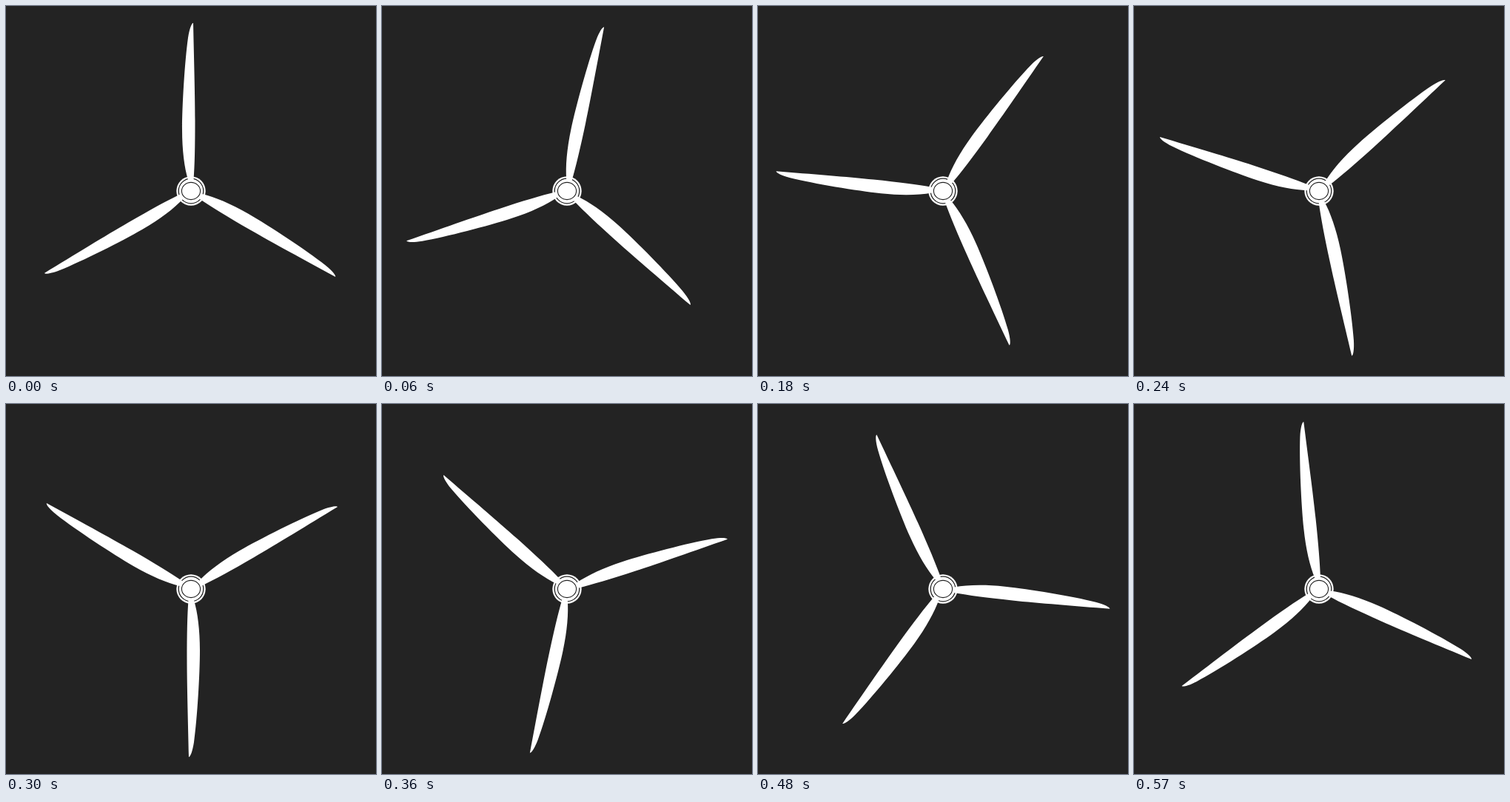
An HTML page for the animation above (0.6 s loop, 500 px wide and 500 px high).

```html
<!DOCTYPE html>
<html lang="en">
<head>
<meta charset="utf-8">
<title>Spinning propeller</title>
<style>
  html, body { margin: 0; height: 100%; overflow: hidden; background: #232323; }
  svg { display: block; width: 100%; height: 100%; }
</style>
</head>
<body>
<svg viewBox="-250 -250 500 500">
  <defs>
    <path id="blade" fill="#fff" d="M3 -227 C4 -180 5.5 -130 5.5 -95 C5.5 -60 5 -35 3.5 -15
      H-4 C-9 -32 -12 -55 -12 -83 C-12 -115 -8.5 -175 -4 -207 C-2 -220 1 -227 3 -227Z"/>
  </defs>
  <circle r="19.7" fill="#fff"/>
  <circle r="16.8" fill="none" stroke="#232323" stroke-width="1.3"/>
  <g id="rotor">
    <use href="#blade"/>
    <use href="#blade" transform="rotate(120)"/>
    <use href="#blade" transform="rotate(240)"/>
  </g>
  <ellipse rx="12.6" ry="11.6" fill="#fff" stroke="#232323" stroke-width="1.1"/>
</svg>
<script>
  const STEP_MS = 30, STEP_DEG = 6, STEPS = 20;
  const rotor = document.getElementById('rotor');

  function draw() {
    const step = Math.floor(performance.now() / STEP_MS) % STEPS;
    rotor.setAttribute('transform', `rotate(${step * STEP_DEG})`);
    requestAnimationFrame(draw);
  }
  draw();
</script>
</body>
</html>
```
